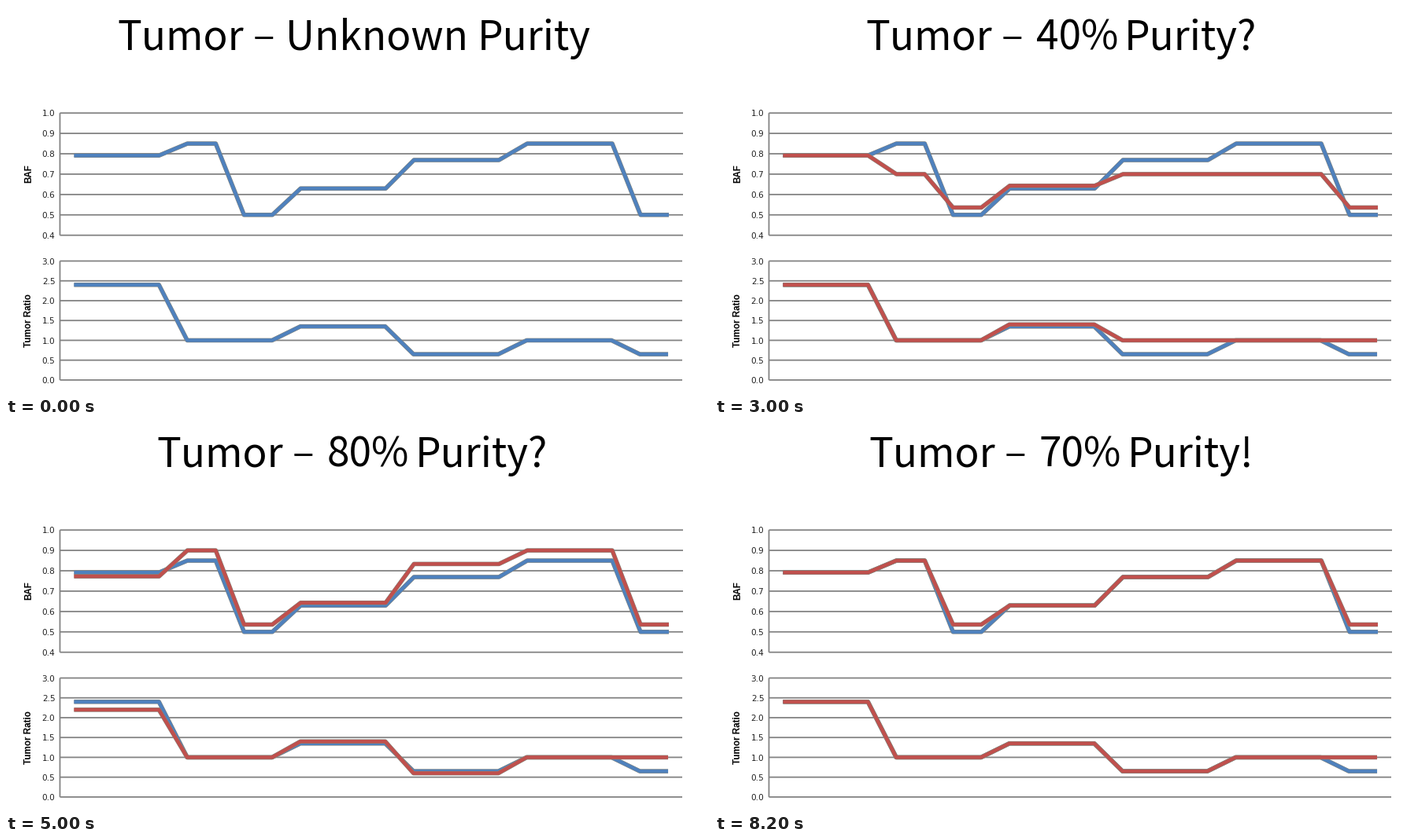
A matplotlib script that plays this animation: 893x495 px, repeating every 9000 ms.

```python
import math

import numpy as np
import matplotlib.pyplot as plt
from matplotlib.animation import FuncAnimation

W, H, DPI = 893, 495, 64
PT = 72 / DPI  # points per pixel

BLUE, RED, SHADE, GRID = "#4f81bd", "#c0504d", "#85857c", "#838383"
LEFT = 68.5

# Segments along the genome: samples, true copies, balanced alleles
SEGMENTS = [(4, 6, False), (2, 2, False), (2, 2, True), (4, 3, False),
            (4, 1, False), (4, 2, False), (2, 1, True)]
RUNS = [n for n, _, _ in SEGMENTS]
TRUE_PURITY = .7
NOISE_FLOOR = .536  # expected BAF of a balanced segment
MAX_COPIES = 9

TRIALS = [.2, .4, .6, .8, .7]
STEPS = ([(None, "")] * 2 + [(p, "?") for p in TRIALS]
         + [(TRUE_PURITY, "!")] * 2)

fig = plt.figure(figsize=(W / DPI, H / DPI), dpi=DPI, facecolor="white")
ax = fig.add_axes([0, 0, 1, 1])
ax.set_xlim(0, W)
ax.set_ylim(H, 0)
ax.axis("off")


def mix_ratio(p, copies):
    """Tumor ratio of a sample with purity p."""
    return p * copies / 2 + 1 - p


def mix_baf(p, copies):
    """B allele share when all but one of the extra copies are B."""
    b = copies - 1 if copies > 2 else copies
    return (p * b + 1 - p) / (2 * mix_ratio(p, copies))


def observed():
    return [(.5 if even else mix_baf(TRUE_PURITY, c), mix_ratio(TRUE_PURITY, c))
            for _, c, even in SEGMENTS]


def fitted(p):
    """Whole copy numbers that best explain the observed ratios at purity p."""
    levels = []
    for (_, _, even), (_, ratio) in zip(SEGMENTS, observed()):
        # Halves round down
        copies = math.ceil(2 * (ratio - 1 + p) / p - .5 - 1e-9)
        if even or not 1 <= copies <= MAX_COPIES:
            copies = 2
        levels.append((NOISE_FLOOR if even else mix_baf(p, copies),
                       mix_ratio(p, copies)))
    return levels


class Chart:
    def __init__(self, name, ticks, top, bottom, right):
        self.low, self.high = ticks[0], ticks[-1]
        self.top, self.bottom = top, bottom
        n = sum(RUNS)
        self.xs = LEFT + (right - LEFT) * (np.arange(n) + .5) / n

        for v in ticks:
            y = self.y(v)
            self.rule([LEFT, right], [y, y])
            ax.text(62.5, y + 4.2, f"{v:.1f}", ha="right", va="baseline",
                    family="DejaVu Sans", size=10.5 * PT, color="#222222")
        self.rule([LEFT, LEFT], [top, bottom])
        ax.text(29.5, (top + bottom) / 2 - .5, name, rotation=90,
                ha="center", va="center", family="Liberation Sans",
                weight="bold", size=11.6 * PT, color="black")

        self.blue = self.curve(BLUE, 2)
        self.red = self.curve(RED, 3)

    def y(self, v):
        share = (self.high - v) / (self.high - self.low)
        return self.top + (self.bottom - self.top) * share

    def rule(self, xs, ys):
        ax.plot(xs, ys, color=GRID, lw=1.8 * PT, snap=False,
                solid_capstyle="butt", zorder=1)

    def curve(self, color, z):
        """A coloured line over a slightly wider grey one."""
        return [ax.plot([], [], color=c, lw=w * PT, zorder=z, snap=False,
                        solid_capstyle="butt", solid_joinstyle="round")[0]
                for c, w in ((SHADE, 5.6), (color, 4.5))]

    def show(self, lines, levels):
        ys = self.y(np.repeat(levels, RUNS)) if levels else []
        for line in lines:
            line.set_data(self.xs if levels else [], ys)


charts = [Chart("BAF", np.arange(4, 11) / 10, 136.2, 291.7, 860),
          Chart("Tumor Ratio", np.arange(7) / 2, 324.5, 475.9, 859)]

for chart, levels in zip(charts, zip(*observed())):
    chart.show(chart.blue, levels)

title = [ax.text(0, 55.5, "", ha="left", va="baseline", color="black",
                 family="Noto Sans CJK JP", size=51.4 * PT) for _ in range(4)]


def set_title(purity, mark):
    if purity is None:
        words, xs = ["Tumor", "–", "Unknown", "Purity"], [141, 314, 355, 599]
    else:
        words = ["Tumor", "–", f"{purity:.0%}", "Purity" + mark]
        shift = 4 if mark == "!" else 0
        xs = [x + shift for x in (191.5, 364, 408, 520)]
    for item, word, x in zip(title, words, xs):
        item.set_text(word)
        item.set_x(x)


def draw(i):
    purity, mark = STEPS[i]
    set_title(purity, mark)
    models = zip(*fitted(purity)) if purity else [None, None]
    for chart, levels in zip(charts, models):
        chart.show(chart.red, levels)
    return [*title, *charts[0].red, *charts[1].red]


anim = FuncAnimation(fig, draw, frames=len(STEPS), interval=1000,
                     init_func=lambda: draw(0), repeat=True, blit=False)
plt.show()
```
